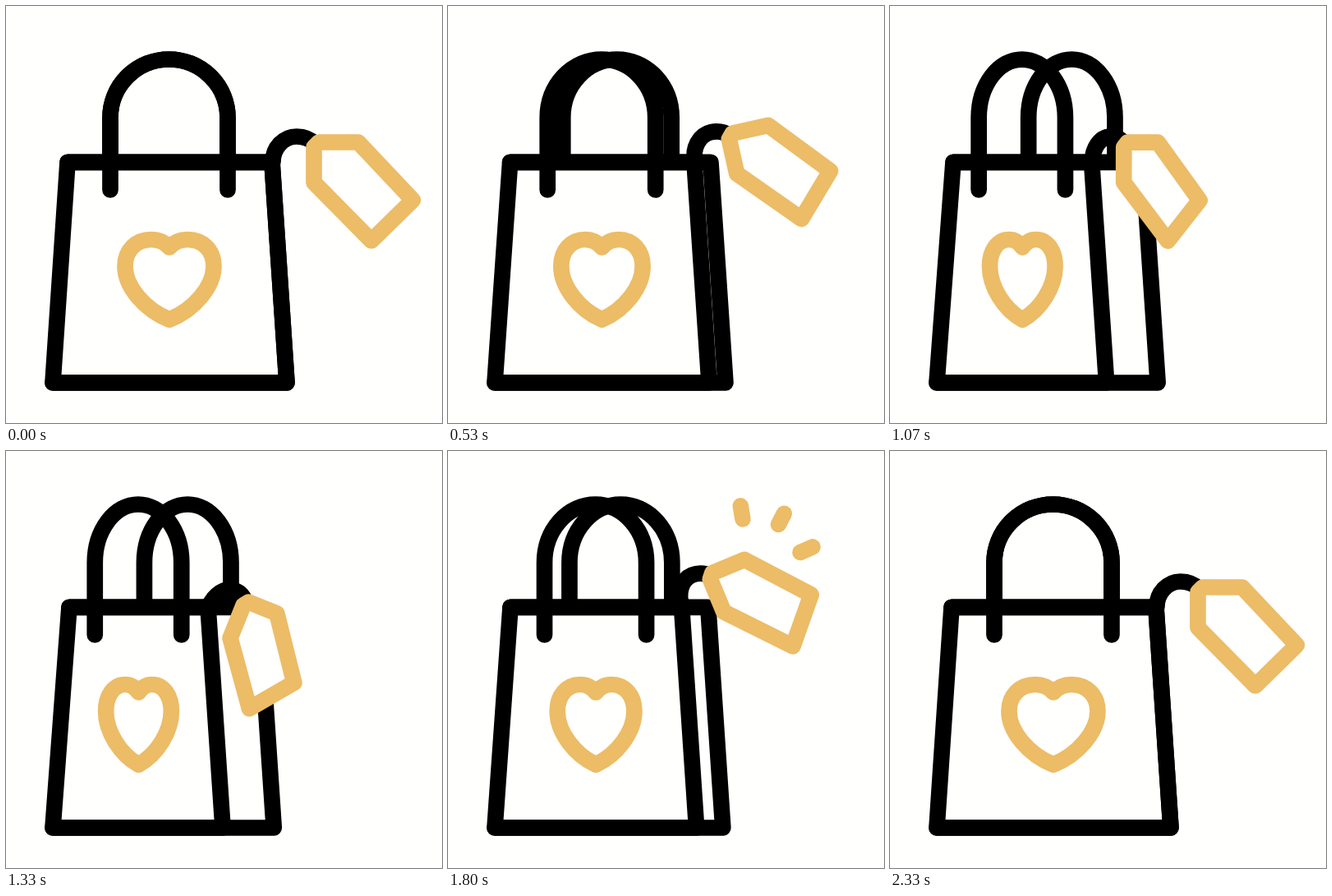
These frames come from a looping animation (531 by 508 pixels, 2.4 s). An HTML page:

```html
<!DOCTYPE html>
<html lang="en">
<head>
<meta charset="utf-8">
<title>Shopping bag</title>
<style>
html, body { margin: 0; width: 100%; height: 100%; overflow: hidden; background: #fffffd; }
svg { display: block; width: 100%; height: 100%; }
path { fill: none; stroke: #000; stroke-width: 19.7; stroke-linecap: round; stroke-linejoin: round; }
.gold { stroke: #ecbc67; }
#tag { fill: #fffffd; }
</style>
</head>
<body>
<svg viewBox="0 0 531 508">
  <path id="back"/>
  <path id="front"/>
  <path id="handles"/>
  <path id="heart" class="gold"/>
  <g id="label">
    <path id="string"/>
    <path id="tag" class="gold"/>
  </g>
  <g id="sparks"></g>
</svg>
<script>
const LOOP = 2400;
const $ = id => document.getElementById(id);
const draw = (id, d) => $(id).setAttribute('d', d);
const phase = (t, a, b) => Math.min(1, Math.max(0, (t - a) / (b - a)));
const ease = u => (1 - Math.cos(Math.PI * u)) / 2;

// Swing of the label: [time, degrees]
const SWING = [[0, 0], [70, 0], [280, -9], [530, -12.5], [740, -20], [1070, 0],
  [1320, 22], [1800, -22.5], [2330, 0], [2400, 0]];
// Sparks: inner x, y, outer x, y
const SPARKS = [[359, 83, 355.3, 61], [402.5, 89.5, 411.8, 71.5], [429, 123.5, 449.5, 114.5]];
const TAG = [[51, -18], [57, -24], [105, -24], [171.5, 46.5], [121, 96], [51, 25]];

const rays = SPARKS.map(() => {
  const ray = document.createElementNS('http://www.w3.org/2000/svg', 'path');
  ray.setAttribute('class', 'gold');
  return $('sparks').appendChild(ray);
});

function slope(keys, i) {
  const a = keys[i - 1], b = keys[i], c = keys[i + 1];
  if (!a || !c || (b[1] - a[1]) * (c[1] - b[1]) <= 0) return 0;
  return (c[1] - a[1]) / (c[0] - a[0]);
}

// Smooth curve through keys, flat at the turning points
function curve(keys, t) {
  let i = 0;
  while (i < keys.length - 2 && t >= keys[i + 1][0]) i++;
  const [t0, v0] = keys[i], [t1, v1] = keys[i + 1];
  const h = t1 - t0, u = (t - t0) / h, w = 1 - u;
  return v0 * w * w * (1 + 2 * u) + v1 * u * u * (3 - 2 * u)
    + h * u * w * (w * slope(keys, i) - u * slope(keys, i + 1));
}

function handle(left, right, end) {
  return `M${left} ${end}V136A${(right - left) / 2} 71 0 0 1 ${right} 136V${end}`;
}

function heart(cx, sx, sy) {
  const pt = (x, y) => `${cx + x * sx} ${333 + (y - 333) * sy}`;
  const half = s => `M${pt(0, 294)}C${pt(-7 * s, 286.5)} ${pt(-15 * s, 284.5)} ${pt(-22 * s, 284.5)}`
    + `C${pt(-41 * s, 284.5)} ${pt(-54 * s, 298)} ${pt(-54 * s, 317)}`
    + `C${pt(-54 * s, 342)} ${pt(-30 * s, 370)} ${pt(0, 382)}`;
  return half(1) + half(-1);
}

function render(t) {
  // 0 = seen from the front, 1 = turned
  const turn = ease(phase(t, 180, 1125)) - ease(phase(t, 1250, 2350));
  const left = 75 + 2 * turn;
  const edge = 324 - 79 * turn;
  const depth = 16 * turn ** 1.15;

  draw('back', `M${left} 190.3H${324 - depth}L${342 - depth} 459H57`
    + handle(127 + 42 * turn, 270 + 4 * Math.sqrt(turn), 190));
  draw('front', `M${left} 190.3H${edge}L${342 - 79 * turn} 459H57Z`);
  draw('handles', handle(127 - 19 * turn, 270 - 57 * turn, 224));

  const beat = 1 + 0.14 * Math.sin(Math.PI * phase(t, 540, 1060)) ** 2;
  draw('heart', heart(199 - 38 * turn, beat * (1 - 0.265 * turn), beat));

  const sx = 1 - 0.235 * turn;
  $('label').setAttribute('transform', `translate(${edge} 190) rotate(${curve(SWING, t)})`);
  draw('string', `M${sx} 0A${29 * sx} 31 0 0 1 ${30 * sx} -31Q${44 * sx} -31 ${54 * sx} -21`);
  draw('tag', 'M' + TAG.map(([x, y]) => `${x * sx} ${y}`).join('L') + 'Z');

  const head = ease(phase(t, 1660, 1875));
  const tail = ease(phase(t, 1875, 2090));
  const width = 19.5 * Math.min(1, head * 4, (1 - tail) * 4);
  rays.forEach((ray, i) => {
    const [x0, y0, x1, y1] = SPARKS[i];
    const at = u => `${x0 + (x1 - x0) * u} ${y0 + (y1 - y0) * u}`;
    ray.setAttribute('d', `M${at(tail)}L${at(head)}`);
    ray.style.strokeWidth = width;
    ray.style.display = width > 0.1 ? '' : 'none';
  });
}

const start = performance.now();
function tick() {
  render((performance.now() - start) % LOOP);
  requestAnimationFrame(tick);
}
render(0);
requestAnimationFrame(tick);
</script>
</body>
</html>
```
